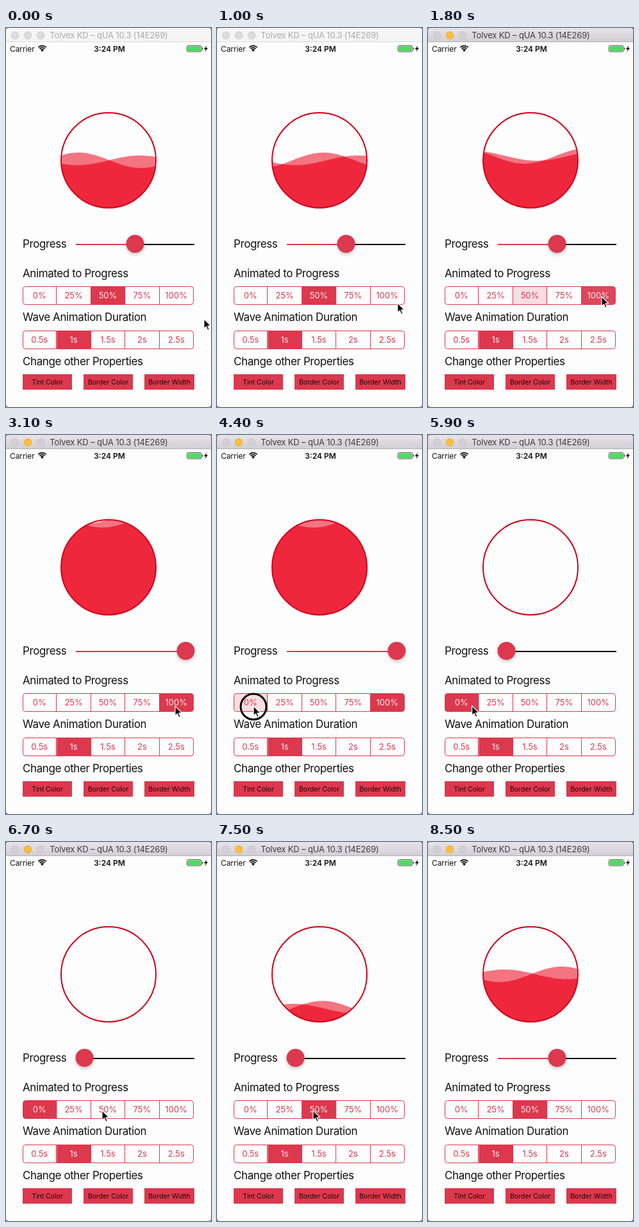
Recreate the animation shown at these times as an HTML page with a canvas. Size 320x590 px, loop 8600 ms.

```html
<!DOCTYPE html>
<html lang="en">
<head>
<meta charset="utf-8">
<title>Wave progress</title>
<style>
  html, body { margin: 0; width: 100%; height: 100%; overflow: hidden; background: #55555a; }
  canvas { display: block; width: 320px; height: 590px; }
</style>
</head>
<body>
<canvas id="stage" width="320" height="590"></canvas>
<script>
const ctx = document.getElementById('stage').getContext('2d');
const LOOP = 8.6, STEP = 0.1;
const PAPER = '#fdfdfd', ACCENT = '#dc384e', FULL = '#ee273d', LIGHT = '#f47481', BORDER = '#d0021b', PALE = '#f8dde1';

// Each tap: press and release time, segment chosen, water level it leads to.
const taps = [
  { down: 1.45, up: 1.65, segment: 4, level: 132 },
  { down: 4.35, up: 4.47, segment: 0, level: 296 },
  { down: 6.95, up: 7.15, segment: 2, level: 206 }
];
const RISE = 0.8, FADE = 0.25, FOCUS = 1.1;

const cursorPath = [
  [0, 309, 453], [0.5, 309, 453], [1.2, 271, 418], [1.8, 271, 418], [2.4, 264, 422], [3.2, 264, 422],
  [4.1, 57, 422], [5.8, 57, 422], [6.6, 150, 418], [7.5, 150, 418], [8.3, 335, 452]
];
const lagPath = [[0, 0], [1.8, 0.1], [4.4, 0.1], [5.1, 0.05], [8.5, 0.04]];

const clamp = v => Math.max(0, Math.min(1, v));
const smooth = v => v * v * (3 - 2 * v);
const mix = (a, b, k) => a + (b - a) * k;

function follow(path, t) {
  const i = path.findIndex(p => p[0] > t);
  if (i < 0) return path[path.length - 1].slice(1);
  const a = path[i - 1], b = path[i], k = (t - a[0]) / (b[0] - a[0]);
  return a.slice(1).map((v, n) => mix(v, b[n + 1], k));
}

function text(str, x, y, size, { color = '#111', align = 'left', weight = 400, spacing = 0 } = {}) {
  ctx.font = `${weight} ${size}px Inter, sans-serif`;
  ctx.letterSpacing = spacing + 'px';
  ctx.textAlign = align;
  ctx.fillStyle = color;
  ctx.fillText(str, x, y);
}

function rect(x, y, w, h, color) {
  ctx.fillStyle = color;
  ctx.fillRect(x, y, w, h);
}

function disc(x, y, r, color) {
  ctx.beginPath();
  ctx.arc(x, y, r, 0, Math.PI * 2);
  ctx.fillStyle = color;
  ctx.fill();
}

function strokeCircle(x, y, r, width, color) {
  ctx.beginPath();
  ctx.arc(x, y, r, 0, Math.PI * 2);
  ctx.lineWidth = width;
  ctx.strokeStyle = color;
  ctx.stroke();
}

function polygon(points, color) {
  ctx.beginPath();
  points.forEach(([x, y]) => ctx.lineTo(x, y));
  ctx.closePath();
  ctx.fillStyle = color;
  ctx.fill();
}

function titleBar(active) {
  const shade = ctx.createLinearGradient(0, 0, 0, 22);
  shade.addColorStop(0, active ? '#e6e4e9' : '#f7f7f7');
  shade.addColorStop(1, active ? '#d0ced4' : '#f4f4f4');
  rect(0, 0, 320, 22, shade);
  rect(0, 21, 320, 1, active ? '#b3b1b7' : '#d9d9db');
  [14, 34, 54].forEach((x, i) => {
    const on = active && i === 1;
    disc(x, 11.5, 6, on ? '#fbbd3a' : active ? '#d2d0d5' : '#dcdcdd');
    strokeCircle(x, 11.5, 5.7, 0.6, on ? '#dca02e' : '#bfbdc3');
  });
  text('Tolvex KD – qUA 10.3 (14E269)', 160.5, 16, 13,
    { color: active ? '#3d3c40' : '#aaaaad', align: 'center', spacing: -0.15 });
}

function statusBar() {
  text('Carrier', 6, 37, 12, { spacing: -0.1 });
  text('3:24 PM', 161.5, 37, 12, { align: 'center', weight: 600 });
  ctx.strokeStyle = '#000';
  ctx.lineWidth = 1.7;
  for (const r of [5.4, 8.4]) {
    ctx.beginPath();
    ctx.arc(56.5, 36, r, -Math.PI * 0.76, -Math.PI * 0.24);
    ctx.stroke();
  }
  polygon([[56.5, 37], [53.8, 33.6], [56.5, 32.6], [59.2, 33.6]], '#000');

  ctx.beginPath();
  ctx.roundRect(282.5, 27.5, 22.5, 9.5, 2);
  ctx.lineWidth = 1;
  ctx.strokeStyle = '#555';
  ctx.stroke();
  rect(283.5, 28.5, 20.5, 7.5, '#4cdc60');
  rect(306, 30.5, 1.3, 3.5, '#555');
  polygon([[313.5, 27], [309, 33], [311.8, 33], [310.5, 37.5], [315, 31], [312.2, 31]], '#000');
}

function wavePath(level, height, crest) {
  const path = new Path2D();
  path.moveTo(84, 284);
  for (let x = 84; x <= 236; x += 2)
    path.lineTo(x, level - height * Math.cos((x - crest) * 2 * Math.PI / 195));
  path.lineTo(236, 284);
  path.closePath();
  return path;
}

function waterBall(t) {
  let level = 206;
  for (const tap of taps) level = mix(level, tap.level, smooth(clamp((t - tap.up) / RISE)));
  const clock = t - follow(lagPath, t)[0];
  const tall = wavePath(level, 12, 113 - 150 * clock);
  const low = wavePath(level, 7.5, 209 - 195 * clock);
  ctx.save();
  ctx.beginPath();
  ctx.arc(160, 206, 74, 0, Math.PI * 2);
  ctx.clip();
  ctx.fillStyle = LIGHT;
  ctx.fill(tall);
  ctx.fill(low);
  ctx.clip(tall);
  ctx.fillStyle = FULL;
  ctx.fill(low);
  ctx.restore();
  strokeCircle(160, 206, 74, 2, BORDER);
}

function slider(t) {
  const done = taps.filter(tap => t >= tap.up + RISE).pop();
  const x = done ? [122.5, 162, 201.5, 241, 280.5][done.segment] : 201.5;
  text('Progress', 26, 342, 17, { spacing: -0.4 });
  rect(109, 336, 185, 2, '#000');
  rect(109, 336, x - 109, 2, ACCENT);
  ctx.save();
  ctx.shadowColor = 'rgba(0, 0, 0, .2)';
  ctx.shadowBlur = 5;
  ctx.shadowOffsetY = 3;
  disc(x, 336, 14, ACCENT);
  ctx.restore();
}

// strength(i) is how far a segment is filled; pale is the one tinted by a touch.
function segments(labels, y, strength, pale) {
  ctx.save();
  ctx.beginPath();
  ctx.roundRect(26.5, y + 0.5, 266, 28, 4);
  ctx.clip();
  labels.forEach((label, i) => {
    const x = 26 + i * 53.4, k = strength(i);
    if (i === pale) rect(x, y, 53.4, 29, PALE);
    ctx.globalAlpha = k;
    rect(x, y, 53.4, 29, ACCENT);
    ctx.globalAlpha = 1;
    if (i) rect(Math.round(x) - 1, y, 1, 29, ACCENT);
    text(label, x + 26.2, y + 19, 13, { color: k > 0.5 ? '#fdeef0' : ACCENT, align: 'center' });
  });
  ctx.restore();
  ctx.beginPath();
  ctx.roundRect(26.5, y + 0.5, 266, 28, 4);
  ctx.lineWidth = 1;
  ctx.strokeStyle = ACCENT;
  ctx.stroke();
}

function progressSegments(t) {
  const last = taps.findLastIndex(tap => t >= tap.up);
  const chosen = last < 0 ? 2 : taps[last].segment;
  const before = last < 1 ? 2 : taps[last - 1].segment;
  const fade = last < 0 ? 1 : clamp((t - taps[last].up) / FADE);
  const held = taps.find(tap => t >= tap.down && t < tap.up);
  const strength = i => i === chosen ? mix(0.8, 1, fade) : 0;
  segments(['0%', '25%', '50%', '75%', '100%'], 402, strength, held ? held.segment : fade < 1 ? before : -1);
}

function controls(t) {
  text('Animated to Progress', 26, 388, 17, { spacing: -0.4 });
  progressSegments(t);
  text('Wave Animation Duration', 26, 456, 17, { spacing: -0.4 });
  segments(['0.5s', '1s', '1.5s', '2s', '2.5s'], 471, i => i === 1 ? 1 : 0, -1);
  text('Change other Properties', 26, 525, 17, { spacing: -0.4 });
  [['Tint Color', 26, 77], ['Border Color', 121, 77], ['Border Width', 216, 78]].forEach(([label, x, w]) => {
    rect(x, 539, w, 24, ACCENT);
    text(label, x + w / 2, 555, 10.5, { align: 'center', color: '#1c0508' });
  });
}

function cursor(t) {
  const [x, y] = follow(cursorPath, t);
  if (taps.some(tap => t >= tap.down && t < tap.up)) strokeCircle(x, y + 1, 20, 3, '#000');
  const shape = [[0, 0], [0, 15], [3.4, 12], [6, 17.5], [8.4, 16.4], [5.9, 11], [10.5, 10.6]];
  polygon(shape.map(([dx, dy]) => [x + dx, y + dy]), '#000');
  ctx.lineWidth = 1.2;
  ctx.strokeStyle = '#fff';
  ctx.stroke();
}

function draw(t) {
  ctx.clearRect(0, 0, 320, 590);
  ctx.save();
  ctx.beginPath();
  ctx.roundRect(0, 0, 320, 590, 4);
  ctx.clip();
  rect(0, 0, 320, 590, PAPER);
  titleBar(t >= FOCUS);
  statusBar();
  waterBall(t);
  slider(t);
  controls(t);
  cursor(t);
  ctx.restore();
}

const start = performance.now();
function frame() {
  const t = (performance.now() - start) / 1000 % LOOP;
  draw(Math.floor(t / STEP + 1e-6) * STEP);
  requestAnimationFrame(frame);
}
frame();
</script>
</body>
</html>
```
